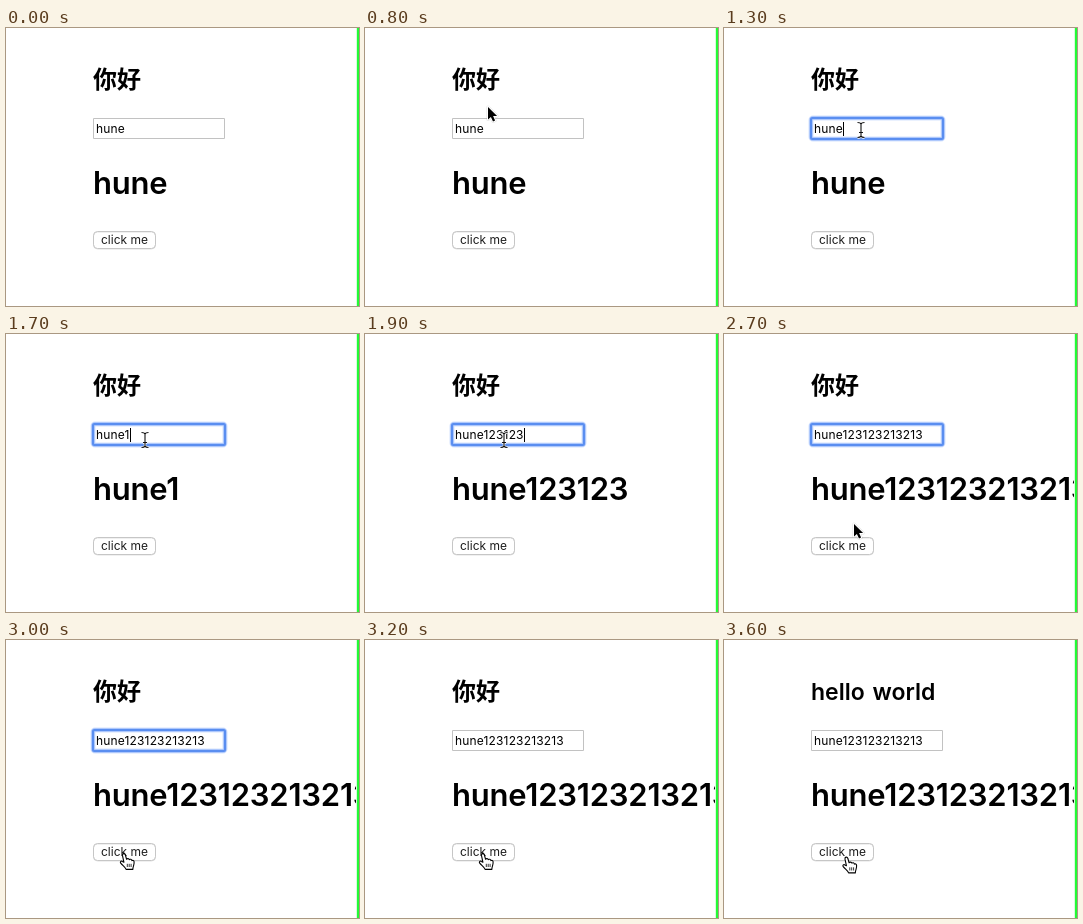
These frames come from a looping animation (353 px wide and 278 px high, 3700 ms). An HTML page with a canvas:

```html
<!DOCTYPE html>
<html lang="en">
<head>
<meta charset="utf-8">
<title>Input binding demo</title>
<style>
  html, body { margin: 0; width: 100%; height: 100%; overflow: hidden; background: #fff; }
  canvas { display: block; width: 353px; height: 278px; }
</style>
</head>
<body>
<canvas id="stage"></canvas>
<script>
const W = 353, H = 278, LOOP = 3700;
const UI = '12px Inter, sans-serif';
const NAME = 'hune', DIGITS = '123123213213';

const canvas = document.getElementById('stage');
const ratio = window.devicePixelRatio || 1;
canvas.width = Math.round(W * ratio);
canvas.height = Math.round(H * ratio);
const ctx = canvas.getContext('2d');

// [start ms, cursor kind, x, y]
const POINTER = [
  [0, 'none', 0, 0],
  [800, 'arrow', 123, 79],
  [900, 'arrow', 130, 146],
  [1000, 'arrow', 135, 120],
  [1100, 'beam', 137, 102],
  [1400, 'beam', 138, 103],
  [1500, 'beam', 139, 106],
  [2000, 'arrow', 137, 119],
  [2100, 'arrow', 136, 131],
  [2300, 'beam', 136, 150],
  [2400, 'beam', 135, 157],
  [2700, 'arrow', 130, 190],
  [2800, 'arrow', 104, 230],
  [2900, 'hand', 110, 215],
  [3000, 'hand', 113.5, 213],
  [3600, 'hand', 118, 216.5]
];

// [start ms, number of digits typed]
const TYPED = [[0, 0], [1700, 1], [1800, 3], [1900, 6], [2000, 8], [2100, 11], [2200, 12]];

const FOCUS = 1300, CARET_OFF = 2700, BLUR = 3200, GREET = 3300;

const ARROW = new Path2D('M0 0V12.6L2.9 9.9L5 14.4L7.1 13.5L5.1 9.1H9.1Z');
const BEAM = new Path2D('M-3.5 -7.5Q-.5 -7.5 0 -6Q.5 -7.5 3.5 -7.5M0 -6V6' +
  'M-3.5 7.5Q-.5 7.5 0 6Q.5 7.5 3.5 7.5M-2 2.5H2');
const HAND = new Path2D(
  'M4.4 9.2L3 2.7C2.6 .3 5.2 -.1 5.9 2L7.1 6.3' +
  'C7.6 5.2 9.5 5.4 9.9 6.7C10.6 5.8 12.2 6.2 12.4 7.6' +
  'C13.2 7 14.5 7.6 14.6 8.9C14.8 11.8 13.6 13.2 13.3 16.4' +
  'H6.6C5.8 14 3.4 12.8 1.2 10.2C.2 8.8 1.8 7.5 2.9 8.4Z');
const HAND_LINES = new Path2D('M7.8 10.8V14M9.7 10.8V14M11.6 10.8V14');

const at = (steps, t) => steps.filter(s => s[0] <= t).pop();

function text(str, x, y, font, { color = '#000', spacing = 0, gap = 0 } = {}) {
  ctx.font = font;
  ctx.letterSpacing = spacing + 'px';
  ctx.wordSpacing = gap + 'px';
  ctx.fillStyle = color;
  ctx.fillText(str, x, y);
}

function stroke(path, color, width) {
  ctx.strokeStyle = color;
  ctx.lineWidth = width;
  ctx.stroke(path);
}

function outline(x, y, w, h, r, color, width) {
  const box = new Path2D();
  box.roundRect(x, y, w, h, r);
  stroke(box, color, width);
}

function drawInput(value, focused, caret) {
  if (focused) {
    outline(87, 90, 132, 21, 2, 'rgba(90,145,250,.25)', 5);
    outline(87, 90, 132, 21, 2, 'rgba(80,135,245,.4)', 3.4);
    outline(87, 90, 132, 21, 1.5, '#5a8ef0', 2);
  } else {
    outline(87.5, 90.5, 131, 20, 0, '#c2c2c2', 1);
  }
  text(value, 90, 105, UI, { spacing: 0.16 });
  if (caret) ctx.fillRect(Math.round(90 + ctx.measureText(value).width), 94, 1, 14);
}

function drawButton() {
  outline(87.5, 204, 62, 17, 4, '#e2e2e2', 1);
  outline(87.5, 203.5, 62, 17, 4, '#c6c6c6', 1);
  text('click me', 95, 216, UI, { color: '#1c1c1c' });
}

const CURSORS = {
  none() {},
  arrow() {
    stroke(ARROW, 'rgba(0,0,0,.12)', 3);
    stroke(ARROW, '#fff', 2);
    ctx.fillStyle = '#000';
    ctx.fill(ARROW);
  },
  beam() {
    stroke(BEAM, '#fff', 2.4);
    stroke(BEAM, '#111', 1.1);
  },
  hand() {
    ctx.fillStyle = '#fff';
    ctx.fill(HAND);
    stroke(HAND, '#000', 1.1);
    stroke(HAND_LINES, '#000', 0.8);
  }
};

function draw(t) {
  ctx.setTransform(ratio, 0, 0, ratio, 0, 0);
  ctx.lineJoin = 'round';
  ctx.fillStyle = '#fff';
  ctx.fillRect(0, 0, W, H);

  const value = NAME + DIGITS.slice(0, at(TYPED, t)[1]);
  const focused = t >= FOCUS && t < BLUR;

  if (t < GREET) text('你好', 87, 60, '600 24px "Noto Sans CJK SC", "Noto Sans CJK", sans-serif');
  else text('hello world', 87, 60, '600 23px Inter, sans-serif', { gap: 2 });

  drawInput(value, focused, focused && t < CARET_OFF);
  text(value, 87, 166, '600 31px Inter, sans-serif', { spacing: -0.22 });
  drawButton();

  ctx.fillStyle = '#d8fadb';
  ctx.fillRect(350, 0, 1, H);
  ctx.fillStyle = '#22fb35';
  ctx.fillRect(351, 0, 2, H);

  const [, kind, x, y] = at(POINTER, t);
  ctx.save();
  ctx.translate(x, y);
  CURSORS[kind]();
  ctx.restore();
}

function tick() {
  draw(performance.now() % LOOP);
  requestAnimationFrame(tick);
}
tick();
</script>
</body>
</html>
```
